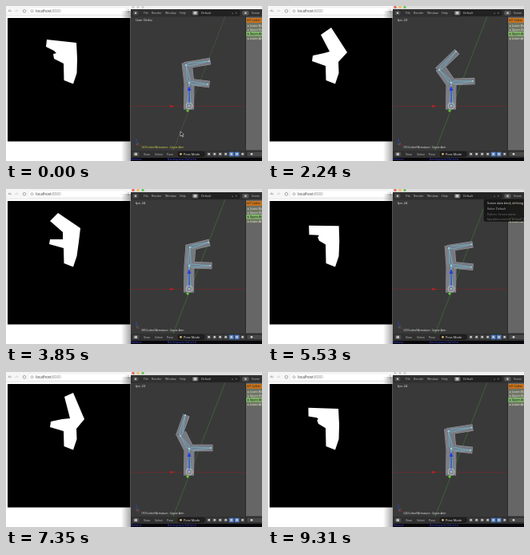
An HTML page with a canvas that plays this animation: 320x194 px, repeating every 9.38 s.

```html
<!DOCTYPE html>
<html lang="en">
<head>
<meta charset="utf-8">
<title>Letter F armature</title>
<style>
html, body { margin: 0; width: 100%; height: 100%; overflow: hidden; background: #fff; }
canvas { display: block; width: 100vw; height: 100vh; }
</style>
</head>
<body>
<canvas id="stage" width="320" height="194"></canvas>
<script>
const c = document.getElementById('stage').getContext('2d');
const LOOP = 9380, CYCLE = 90;
const SANS = 'Open Sans, Noto Sans, sans-serif';
const SMALL = 3.6;

// time in ms -> timeline position (wraps every CYCLE)
const clock = [[0, 20], [600, 20], [2240, 55], [3850, 83], [5530, 119],
  [6300, 136], [7350, 160], [9310, 204], [9380, 206]];

// flat silhouette: tip inner, tip outer, shoulder, notch, armpit, arm low, arm high, crotch, inner elbow
const shapes = [
  [20, [50,51, 51,42, 88,46, 89,66, 72,72, 60,66, 59,60, 63,59, 60,56]],
  [27, [51,59, 50,47, 88,46, 89,66, 72,69, 65,64, 63,60, 63,59, 62,58]],
  [46, [55,43, 61,34, 94,49, 91,66, 72,74, 55,70, 54,61, 70,60, 71,55]],
  [55, [66,36, 79,27, 99,58, 88,70, 72,75, 55,69, 56,62, 70,59, 77,57]],
  [70, [73,31, 84,26, 98,59, 88,71, 72,74, 55,69, 56,62, 70,59, 80,58]],
  [83, [55,40, 65,30, 93,49, 91,66, 72,74, 54,69, 55,63, 71,63, 71,54]]
];
// rig: elbow, upper tip, lower arm tip
const rigs = [
  [20, [225,74, 254,69, 252,98]],
  [27, [226,74, 255,70, 254,98]],
  [46, [227,73, 250,64, 255,96]],
  [55, [214,80, 235,57, 256,94]],
  [70, [218,80, 224,54, 256,95]],
  [83, [230,73, 253,67, 255,96]]
];

const mix = (a, b, k) => a + (b - a) * k;

function timeline(t) {
  let i = 1;
  while (i < clock.length - 1 && t > clock[i][0]) i++;
  const [t0, a] = clock[i - 1], [t1, b] = clock[i];
  return mix(a, b, (t - t0) / (t1 - t0)) % CYCLE;
}

function pose(keys, at) {
  if (at < keys[0][0]) at += CYCLE;
  let i = keys.length - 1;
  while (at < keys[i][0]) i--;
  const [f0, a] = keys[i];
  const [f1, b] = keys[i + 1] || [keys[0][0] + CYCLE, keys[0][1]];
  const k = (at - f0) / (f1 - f0);
  return a.map((v, j) => mix(v, b[j], k));
}

function rect(x, y, w, h, fill) {
  c.fillStyle = fill;
  c.fillRect(x, y, w, h);
}

function box(x, y, w, h, fill, edge, r = 2) {
  c.beginPath();
  c.roundRect(x, y, w, h, r);
  c.fillStyle = fill;
  c.fill();
  if (edge) { c.strokeStyle = edge; c.lineWidth = .5; c.stroke(); }
}

function text(s, x, y, size, fill, family = SANS) {
  c.font = `${size}px ${family}`;
  c.fillStyle = fill;
  c.fillText(s, x, y);
}

function path(p, close) {
  c.beginPath();
  for (let i = 0; i < p.length; i += 2) c.lineTo(p[i], p[i + 1]);
  if (close) c.closePath();
}

function line(p, stroke, width = 1) {
  path(p);
  c.strokeStyle = stroke;
  c.lineWidth = width;
  c.stroke();
}

function poly(p, fill) {
  path(p, true);
  c.fillStyle = fill;
  c.fill();
}

function dot(x, y, r, fill) {
  c.beginPath();
  c.arc(x, y, r, 0, 7);
  c.fillStyle = fill;
  c.fill();
}

function ring(x, y, r, stroke) {
  c.beginPath();
  c.arc(x, y, r, 0, 7);
  c.strokeStyle = stroke;
  c.lineWidth = .7;
  c.stroke();
}

function browser(at) {
  rect(0, 0, 156, 194, '#fff');
  rect(0, 0, 156, 12.5, '#f6f6f6');
  rect(0, 12, 156, .5, '#d5d5d5');
  line([7, 6.3, 3, 6.3, 5, 4.3], '#888', .7);
  line([11, 6.3, 15, 6.3, 13, 4.3], '#ccc', .7);
  ring(23, 6.3, 1.8, '#888');
  box(28, 2, 122, 8.5, '#fff', '#e2e2e2');
  ring(32.5, 6.3, 1.5, '#888');
  text('localhost:', 37, 8, 4.7, '#333');
  const w = c.measureText('localhost:').width;
  text('8080', 37 + w, 8, 4.7, '#888');
  for (const y of [4.5, 6.3, 8.1]) dot(153, y, .5, '#777');
  rect(2, 15, 153.5, 154.5, '#000');

  const s = pose(shapes, at);
  poly([...s.slice(0, 8), 88.5,84, 84,97.5, 72.5,93, ...s.slice(8)], '#fff');

  // shadow of the window in front
  const shade = c.createLinearGradient(144, 0, 156, 0);
  shade.addColorStop(0, 'rgba(0,0,0,0)');
  shade.addColorStop(1, 'rgba(0,0,0,.35)');
  rect(144, 6, 12, 188, shade);
}

function bone(ax, ay, bx, by) {
  const dx = bx - ax, dy = by - ay, n = 2 / Math.hypot(dx, dy);
  const mx = ax + dx * .14, my = ay + dy * .14;
  path([ax, ay, mx - dy * n, my + dx * n, bx, by, mx + dy * n, my - dx * n], true);
  c.fillStyle = 'rgba(110,140,158,.5)';
  c.fill();
  c.strokeStyle = '#78c3dc';
  c.lineWidth = .6;
  c.stroke();
  dot(ax, ay, 1, '#a5d2e0');
  dot(bx, by, 1, '#a5d2e0');
}

function letter(at) {
  const [ex, ey, ux, uy, lx, ly] = pose(rigs, at);
  c.lineJoin = 'miter';
  for (const [edge, color] of [[1, '#96979f'], [0, '#777980']]) {
    line([228.5, 129 + edge / 2, 229, 97, ex + 1, ey - 3], color, 12 + edge);
    line([229, 95, lx + 2 + edge / 2, ly], color, 7.5 + edge);
    line([ex - 2, ey + .5, ux + 1 + edge / 2, uy], color, 7.5 + edge);
  }
  line([225, 128, 225, 98, ex - 3, ey], 'rgba(190,190,202,.4)', .6);
  line([233, 128, 233, 99, lx, ly + 2], 'rgba(190,190,202,.4)', .6);
  bone(229, 125, 229, 96);
  bone(229, 96, ex, ey);
  bone(ex, ey, ux, uy);
  bone(229, 96, lx, ly);

  line([229, 124, 229, 105], '#233bd5', 1);
  poly([226.8, 106, 229, 100, 231.2, 106], '#2039e8');
  ring(229, 125, 4, '#d2d2d2');
  ring(229, 125, 2.2, '#aaa');
  dot(227, 131, 1.6, '#65c931');
  poly([205, 124, 211, 125.2, 205, 127], '#b92323');
}

function editor(t, at) {
  const idle = t < 500, focused = !idle && t < 9200;
  rect(156, 0, 164, 194, '#393939');
  line([274, 13, 209, 181], idle ? '#44583f' : '#3c6e36', .8);
  line([156, 125.5, 300, 125.5], '#6b2a2e', .8);
  letter(at);

  // title bar and top menu
  rect(156, 0, 164, 4, focused ? '#dedede' : '#f2f2f2');
  ['#ee6259', '#f4bd4e', '#60c654'].forEach((k, i) =>
    dot(159 + i * 6, 1.5, 1.6, focused ? k : '#d0d0d0'));
  rect(156, 4, 164, 9.5, '#303030');
  box(158, 5.5, 8, 6.5, '#484848', '#222');
  dot(162, 8.8, 1.3, '#bbb');
  [['File', 172], ['Render', 182], ['Window', 199], ['Help', 217]]
    .forEach(([s, x]) => text(s, x, 10.2, SMALL, '#c4c4c4'));
  box(232, 5.5, 60, 6.5, '#222', '#111');
  box(232, 5.5, 9, 6.5, '#5a5a5a', '#111');
  rect(234.5, 7, 4, 3.5, '#c7c7c7');
  text('Default', 244, 10.2, SMALL, '#ccc');
  text('+   ×', 282, 10.2, SMALL, '#ccc');
  box(295, 5.5, 9, 6.5, '#555', '#222');
  dot(299.5, 8.8, 1.4, '#bbb');
  text('Scene', 307, 10.2, SMALL, '#ccc');

  // channel list
  rect(299, 13.5, 21, 180, '#2a2a2a');
  rect(300, 13.5, 20, 167, '#666');
  rect(300.5, 15, 19.5, 6, '#c27120');
  rect(300.5, 21.5, 19.5, 21, '#717765');
  rect(300.5, 32, 19.5, 5.6, '#80b36b');
  text('▾ F: Letter', 301.5, 19.2, SMALL, '#241505');
  ['Lower.Bone', 'Upper.Bone', 'Upper.Arm', 'Lower.Arm'].forEach((s, i) =>
    text('▸ ' + s, 302, 25.7 + i * 5.3, SMALL, i === 2 ? '#111' : '#e5e5e5'));

  // viewport labels
  const speed = (t > 2000 && t < 3000) || (t > 7000 && t < 8000) ? 23 : 24;
  text(idle ? 'User Ortho' : 'fps: ' + speed, 162, 19.3, 4, '#f0f0f0');
  text(`(${Math.floor(at + .001)}) LetterFArmature : Upper.Arm`, 169.5, 177.6, 3.4,
    idle ? '#dddd4b' : '#eee');
  line([163, 174, 163, 166], '#3546c8', .8);
  line([163, 174, 166, 171], '#4a8a38', .8);
  line([163, 174, 168, 174], '#963335', .8);

  // bottom menu
  rect(156, 181, 164, 9, '#303030');
  box(158, 182.3, 9, 6.2, '#4b4b4b', '#222');
  rect(160.5, 183.8, 3.5, 3.2, '#bbb');
  [['View', 172], ['Select', 186], ['Pose', 201]]
    .forEach(([s, x]) => text(s, x, 186.7, SMALL, '#c4c4c4'));
  box(215, 182.3, 33, 6.2, '#1f1f1f', '#111');
  dot(218.5, 185.3, 1.4, '#dfb275');
  text('Pose Mode', 222, 186.8, 3.9, '#eee');
  for (let i = 0; i < 7; i++) {
    const x = 250.5 + i * 7;
    box(x, 182.3, 6.5, 6.2, i === 4 || i === 5 ? '#5680c2' : '#484848', '#222', 1);
    dot(x + 3.2, 185.3, 1.3, '#d5d5d5');
  }
  box(301, 182.3, 20, 6.2, '#484848', '#222', 1);
  dot(307, 185.3, 1.4, '#d5d5d5');
  rect(156, 190, 164, 4, '#07070b');
  const mono = 'DejaVu Sans Mono, monospace';
  text('Remove', 156, 193, 3.75, '#3d43c3', mono);
  text('Backspace/Delete', 202, 193, 3.75, '#3d43c3', mono);
}

function pointer(t) {
  if (t > 700) return;
  const k = t / 700, x = mix(218, 190, k * k), y = mix(157, 194, k * k);
  path([x, y, x, y + 6, x + 1.5, y + 4.7, x + 2.7, y + 7, x + 3.6, y + 6.5, x + 2.5, y + 4.2, x + 4.3, y + 4], true);
  c.fillStyle = '#111';
  c.fill();
  c.strokeStyle = '#eee';
  c.lineWidth = .6;
  c.stroke();
}

function tooltip() {
  box(270, 13, 56, 27.5, 'rgba(22,22,22,.95)', '#111');
  text('Screen data block, defining', 274, 19.3, SMALL, '#eee');
  text('Value: Default', 274, 25.5, SMALL, '#bbb');
  text('Python: Screen.name', 274, 33.3, SMALL, '#777');
  text('bpy.data.screens["Default"]', 274, 39, SMALL, '#777');
}

const results = [
  ['GOSSA CAPTURE', '/Applications/GOSSA CAPTURE.app'],
  ['Galdor Window', '/Applications/Galdor Window.app'],
  ['Gorra', '/Users/me/Applications/Window Apps.localized/Default/Gorra.app/Contents/…'],
  ['General', '/System/Library/PreferencePanes/Appearance.prefPane'],
  ['Users & Groups', '/System/Library/PreferencePanes/Accounts.prefPane'],
  ['Galdor Window Finch', '/Applications/Galdor Window Finch.app'],
  ['Glimner', '/Applications/Utilities/Glimner.app'],
  ['Galdor Store', '/Users/me/Applications/Window Apps.localized/Default/Store.app/Contents/…'],
  ['Galdor Search', '/Users/me/Applications/Window Apps.localized/Default/Search.app/Contents…']
];

function launcher() {
  c.save();
  c.shadowColor = 'rgba(0,0,0,.45)';
  c.shadowBlur = 5;
  rect(110, 16, 179, 153, 'rgba(232,232,232,.95)');
  c.restore();
  rect(110, 16, 179, 22, '#dcdcdc');
  rect(113, 18, 152, 16, '#c6c6c6');
  text('g', 115, 30.5, 13, '#333');
  rect(123.5, 20.5, .6, 11, '#555');
  dot(276, 27, 7, '#30243a');
  rect(112, 38.7, 175, 13.5, '#5a128d');
  results.forEach(([name, file], i) => {
    const y = 37.2 + i * 14.2, on = i === 0;
    text(name, 127, y + 7.3, 6, on ? '#fff' : '#333');
    text(file, 127, y + 12.6, 3.7, on ? '#d7b9ea' : '#999');
    text(on ? '↵' : '⌘' + (i + 1), 273, y + 10, 6, on ? '#fff' : '#5a2b83',
      'Open Sans, DejaVu Sans, sans-serif');
  });
  box(110, 168.5, 43, 6.5, '#f0f0f0', '#bbb', 1);
  text('Borvin Update Available', 112, 173, 3.4, '#444');
}

function draw(now) {
  const t = now % LOOP, at = timeline(t);
  c.clearRect(0, 0, 320, 194);
  browser(at);
  editor(t, at);
  pointer(t);
  if (t >= 5390 && t < 5950) tooltip();
  if (t >= 6160 && t < 6580) launcher();
}

let start;
function tick(now) {
  start ??= now;
  draw(now - start);
  requestAnimationFrame(tick);
}
requestAnimationFrame(tick);
</script>
</body>
</html>
```
